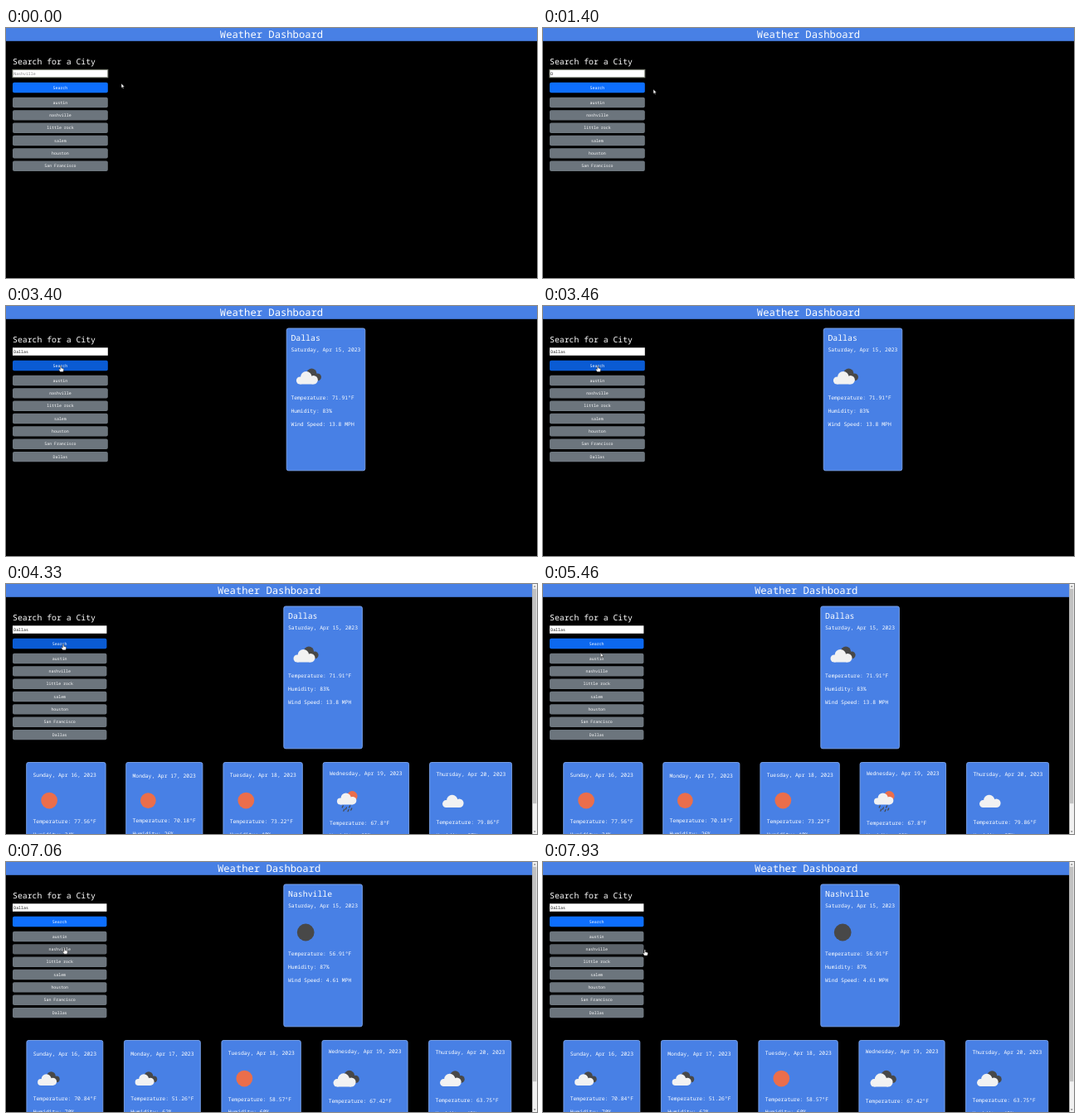
These frames come from a looping animation (640x302 px, 8 s). An HTML page:

```html
<!DOCTYPE html>
<html lang="en">
<head>
<meta charset="utf-8">
<title>Weather Dashboard</title>
<style>
  html, body { margin: 0; width: 100%; height: 100%; overflow: hidden; background: #000; }
  svg { display: block; width: 100vw; height: 100vh; }
  text { font-family: "Noto Sans Mono", "DejaVu Sans Mono", monospace; text-rendering: geometricPrecision; }
</style>
</head>
<body>
<svg id="stage" viewBox="0 0 640 302"></svg>
<script>
const LOOP = 8000, TICK = 200 / 3;
const BLUE = '#4880e5', EDGE = '#7ea6ee', LIGHT = '#f2f2f2', DARK = '#484848', SUN = '#eb6e4b';
const T = { blur: 2733, saved: 2933, current: 3395, forecast: 3460, nextCurrent: 6530, nextForecast: 6595 };

// Pointer tip: time, x, y
const PATH = [
  [0, 139, 67], [333, 133, 74], [2133, 133, 74], [2400, 84, 79.5], [2533, 67.4, 72.8],
  [2800, 66.2, 72.5], [3000, 66.5, 72.5], [3133, 66, 72], [4067, 66, 72], [4333, 69, 72.3],
  [5133, 69, 72.3], [5400, 69.3, 83], [5467, 69.3, 87.6], [5933, 70, 102], [6267, 70, 102],
  [6467, 70, 103], [6667, 70.3, 103.5], [6933, 70.3, 103.5], [7067, 71, 104],
  [7400, 71, 104], [7933, 122.8, 105.7], [8000, 122.8, 105.7]
];
const TYPED = [[1400, 1], [1467, 2], [1600, 3], [1733, 5], [1800, 6]];
const CITIES = ['austin', 'nashville', 'little rock', 'salem', 'houston', 'San Francisco', 'Dallas'];
const DAYS = ['Sunday, Apr 16', 'Monday, Apr 17', 'Tuesday, Apr 18', 'Wednesday, Apr 19', 'Thursday, Apr 20'];

// Day: left, right, date y, temperature y, icon, temperature, humidity
const REPORTS = {
  Dallas: {
    now: ['broken', '71.91', 83, '13.8'],
    days: [
      [24.3, 120.5, 231, 287, 'sun', '77.56', 24],
      [144.3, 237.3, 232, 286, 'sun', '70.18', 26],
      [261.5, 357.7, 231, 287, 'sun', '73.22', 40],
      [381.7, 486, 229, 288.5, 'rain', '67.8', 68],
      [510.2, 610, 230, 288, 'cloud', '79.86', 27]
    ]
  },
  Nashville: {
    now: ['night', '56.91', 87, '4.61'],
    days: [
      [24.5, 117.2, 232, 286, 'broken', '70.84', 70],
      [142, 234.7, 232, 286, 'broken', '51.26', 62],
      [259.5, 355.7, 231, 286.5, 'sun', '58.57', 60],
      [380.5, 484.5, 229, 289, 'broken', '67.42', 38],
      [509.2, 609.2, 230, 288, 'broken', '63.75', 42]
    ]
  }
};

const rect = (x, y, w, h, fill, more = '') =>
  `<rect x="${x}" y="${y}" width="${w}" height="${h}" fill="${fill}" ${more}/>`;
const circle = (x, y, r, fill) => `<circle cx="${x}" cy="${y}" r="${r}" fill="${fill}"/>`;
// y is the middle of the capitals
const text = (x, y, size, str, fill = '#fff', anchor = 'start') =>
  `<text x="${x}" y="${y + size * 0.35}" font-size="${size}" fill="${fill}" text-anchor="${anchor}">${str}</text>`;
const panel = (l, r, t, b) =>
  rect(l + .4, t, r - l - .8, b - t, BLUE, `rx="2.2" stroke="${EDGE}" stroke-width=".9"`);

const frontCloud = circle(-10.6, 5, 4.5, LIGHT) + circle(-3.2, .8, 6.8, LIGHT) +
  circle(5.6, 4.2, 5.3, LIGHT) + rect(-10.6, 3, 16.2, 6.5, LIGHT);
const backCloud = circle(3.4, -3.4, 6, DARK) + circle(10.6, .8, 4.4, DARK) + rect(2, -1, 8.6, 6.2, DARK);
const drops = [[-5, 6], [-1, 8], [3, 6], [-3.5, 10], [1.5, 10.5], [5, 9]]
  .map(([x, y]) => `<path d="M${x} ${y}l-1 2" stroke="${DARK}" stroke-width="1.2" stroke-linecap="round"/>`).join('');
const ICONS = {
  sun: circle(0, 0, 10.6, SUN),
  night: circle(0, 0, 10.4, DARK),
  broken: backCloud + frontCloud,
  cloud: `<g transform="translate(2 -1)">${frontCloud}</g>`,
  rain: circle(5.5, -5, 6, SUN) +
    `<g transform="translate(1 -3.5) scale(.86)">${frontCloud}</g>` + drops
};
const icon = (name, x, y, s = 1) => `<g transform="translate(${x} ${y}) scale(${s})">${ICONS[name]}</g>`;

function currentCard(city, left) {
  const [pic, temp, hum, wind] = REPORTS[city].now, x = left + 5.6;
  return panel(left, left + 95.4, 27, 198.8) +
    text(x, 39, 9.85, city) +
    text(x, 53, 6.37, 'Saturday, Apr 15, 2023') +
    icon(pic, left + (pic === 'night' ? 26.8 : 27.2), 85) +
    text(x, 111, 6.37, `Temperature: ${temp}°F`) +
    text(x, 127, 6.37, `Humidity: ${hum}%`) +
    text(x, 142.7, 6.37, `Wind Speed: ${wind} MPH`);
}

const forecastCards = city => REPORTS[city].days.map(([l, r, dateY, tempY, pic, temp, hum], i) => {
  const x = l + 8.2, s = (r - l - 30) / 71;
  return panel(l, r, 215.5, 310) +
    text(x, dateY, 6.37, DAYS[i] + ', 2023') +
    icon(pic, l + 11.5 + 17.5 * s, 261.6, s) +
    text(x, tempY, 6.37, `Temperature: ${temp}°F`) +
    text(x, tempY + 15.5, 6.37, `Humidity: ${hum}%`);
}).join('');

const scrollbar = () => rect(634.3, 0, 5.7, 302, '#f1f1f1') + rect(635, 5.7, 4.3, 259.5, '#c1c1c1') +
  '<path d="M635.8 3.6h2.8l-1.4-1.6zM635.8 298.4h2.8l-1.4 1.6z" fill="#606060"/>';

function pointerAt(t) {
  let i = 1;
  while (i < PATH.length - 1 && PATH[i][0] < t) i++;
  const [t0, x0, y0] = PATH[i - 1], [t1, x1, y1] = PATH[i];
  const k = Math.min(1, Math.max(0, (t - t0) / (t1 - t0)));
  return [x0 + (x1 - x0) * k, y0 + (y1 - y0) * k];
}

const over = (t, mid) => {
  const [x, y] = pointerAt(t);
  return x > 8 && x < 124 && Math.abs(y - mid) < 6.2;
};
// Hover fades in over about 150 ms
const hover = (t, mid) => [25, 75, 125].filter(d => over(Math.max(0, t - d), mid)).length / 3;
const mix = (a, b, k) => `rgb(${a.map((v, i) => Math.round(v + (b[i] - v) * k))})`;

function button(t, mid, label, right, from, to) {
  return rect(8, mid - 6.2, right - 8, 12.4, mix(from, to, hover(t, mid)), 'rx="2"') +
    text((8 + right) / 2, mid, 4.93, label, '#fff', 'middle');
}

function pointer(t) {
  const [x, y] = pointerAt(t);
  const hand = [72, ...CITIES.map((_, i) => 90 + 15.35 * i)].some(mid => over(t, mid));
  const d = hand
    ? 'M-.7 .6Q0-.4 .7 .6V3L3 3.5Q3.8 3.8 3.7 4.8L3 7.4H-.7L-2.4 4.8Q-2.4 3.8-1.5 4.1L-.7 4.7Z'
    : 'M0 0V5.4L1.2 4.3 2 6.2 2.9 5.8 2.1 4H3.8Z';
  return `<path transform="translate(${x} ${y})" d="${d}" fill="#fff" stroke="#111" stroke-width=".45"/>`;
}

function scene(t) {
  const narrow = t >= T.forecast, width = narrow ? 634.3 : 640;
  const right = narrow ? 121.4 : 122.8;
  const typed = TYPED.reduce((n, [at, len]) => t >= at - 5 ? len : n, 0);
  const focused = t < T.blur;

  let out = rect(0, 0, 640, 302, '#000') + rect(0, 0, width, 15.8, BLUE) +
    text(width / 2, 8, 12.2, 'Weather Dashboard', '#fff', 'middle') +
    text(8, 41, 9.8, 'Search for a City') +
    rect(8, 50.3, right - 8, 9.5, '#fff', focused ? 'stroke="#7b8072" stroke-width="1"' : '') +
    text(9.2, 55.2, 4.93, typed ? 'Dallas'.slice(0, typed) : 'Nashville', typed ? '#111' : '#858585') +
    button(t, 72, 'Search', right, [13, 110, 253], [10, 91, 211]);

  CITIES.slice(0, t < T.saved ? 6 : 7).forEach((name, i) => {
    out += button(t, 90 + 15.35 * i, name, right, [108, 117, 125], [92, 99, 106]);
  });
  if (t >= T.current) out += currentCard(t < T.nextCurrent ? 'Dallas' : 'Nashville', narrow ? 334.4 : 337.8);
  if (narrow) out += forecastCards(t < T.nextForecast ? 'Dallas' : 'Nashville') + scrollbar();
  return out + pointer(t);
}

const stage = document.getElementById('stage');
let shown = -1;
function frame() {
  const step = Math.floor((performance.now() % LOOP + 5) / TICK);
  if (step !== shown) {
    shown = step;
    stage.innerHTML = scene(Math.min(LOOP, step * TICK));
  }
  requestAnimationFrame(frame);
}
frame();
</script>
</body>
</html>
```
